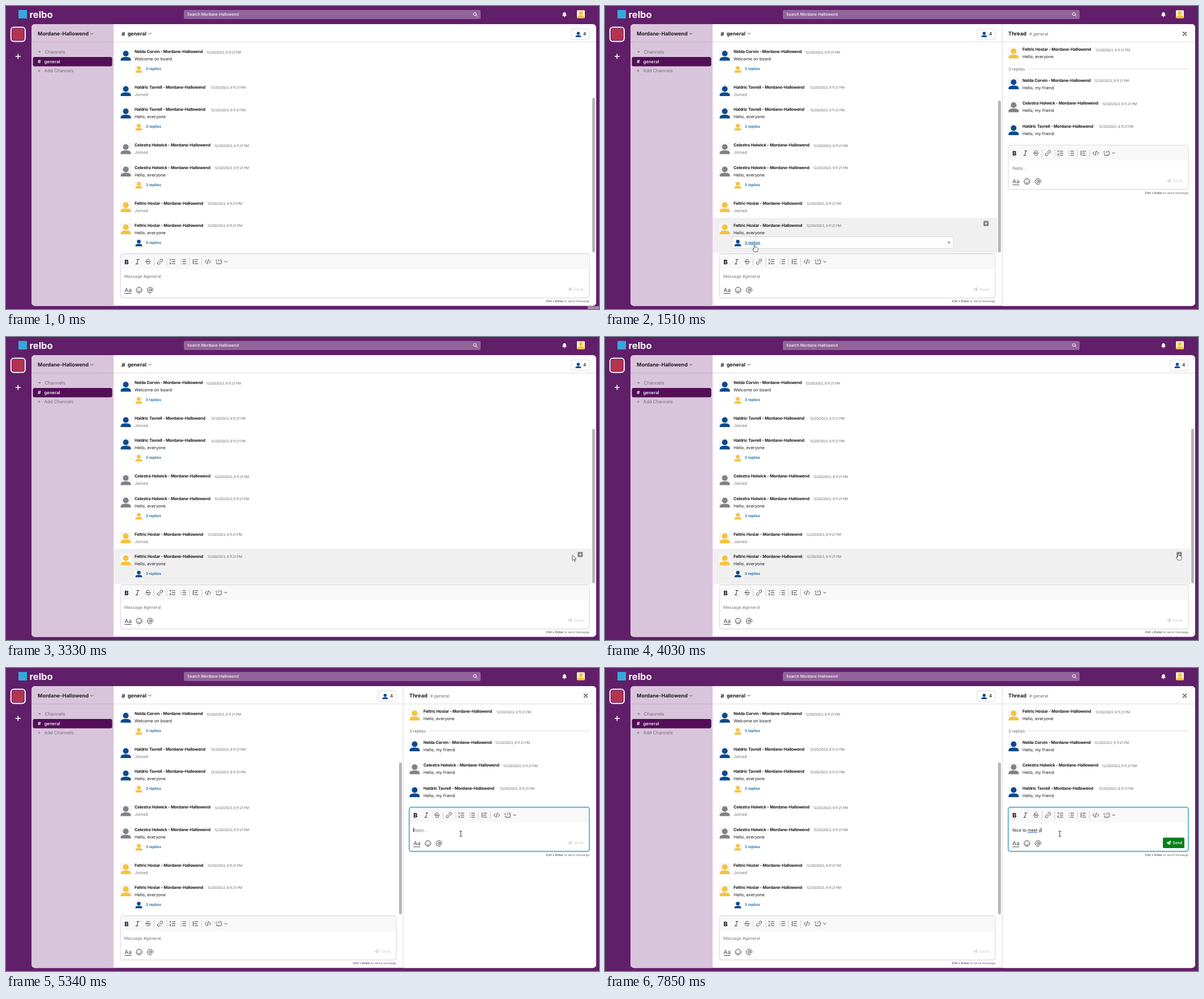
Animation, 1047 px wide and 535 px high, one loop 8000 ms. Source, as an HTML page:

```html
<!DOCTYPE html>
<html lang="en">
<head>
<meta charset="utf-8">
<title>Team chat</title>
<style>
html, body { margin: 0; width: 100%; height: 100%; overflow: hidden; background: #611f69; }
svg { display: block; width: 100%; height: 100%; }
text { font-family: Inter, "Open Sans", sans-serif; white-space: pre; text-rendering: geometricPrecision; }
.ico { fill: none; stroke: #3c3c3c; stroke-width: 1; stroke-linecap: round; stroke-linejoin: round; }
</style>
</head>
<body>
<svg id="stage" viewBox="0 0 1047 535"></svg>
<script>
const LOOP = 8000, OPEN_X = 701, SHUT_X = 1042;
const INK = '#1d1c1d', GREY = '#6b6a6b', LINK = '#1264a3';
const BLUE = '#0b4a8f', SILVER = '#828282', GOLD = '#f5c33b';
const TEAM = 'Mordane-Hallowend';
const STAMP = '12/20/2023, 9:11:21 PM';

// name, avatar colour, offset of the time stamp
const nelda = ['Nelda Corvin', BLUE, 127];
const haldric = ['Haldric Tavrell', BLUE, 135];
const celestra = ['Celestra Holwick', SILVER, 141];
const feltric = ['Feltric Hoslar', GOLD, 129];

// person, centre of the name line, text, colour of the replier
const feed = [
  [nelda, 80.5, 'Welcome on board', GOLD],
  [haldric, 143, 'Joined'],
  [haldric, 182.5, 'Hello, everyone', GOLD],
  [celestra, 245.5, 'Joined'],
  [celestra, 285, 'Hello, everyone', GOLD],
  [feltric, 348, 'Joined'],
  [feltric, 387, 'Hello, everyone', BLUE]
];
const thread = [
  [feltric, 76.5, 'Hello, everyone'],
  [nelda, 131, 'Hello, my friend'],
  [celestra, 171.5, 'Hello, my friend'],
  [haldric, 212, 'Hello, my friend']
];

// ---- drawing helpers ----
const text = (x, cy, size, str, fill = INK, weight = 400, more = '') =>
  `<text x="${x}" y="${cy + size * 0.364}" font-size="${size}" fill="${fill}" font-weight="${weight}" ${more}>${str}</text>`;
const rect = (x, y, w, h, r, fill, more = '') =>
  `<rect x="${x}" y="${y}" width="${w}" height="${h}" rx="${r}" fill="${fill}" ${more}/>`;
const line = (x1, y1, x2, y2, stroke, w = 1, more = '') =>
  `<path d="M${x1} ${y1}L${x2} ${y2}" stroke="${stroke}" stroke-width="${w}" fill="none" ${more}/>`;
const icon = (x, y, d, more = '') => `<path class="ico" transform="translate(${x} ${y})" d="${d}" ${more}/>`;
const group = (id, body, more = '') => `<g id="${id}" ${more}>${body}</g>`;
const chevron = (x, y, more) => icon(x, y, 'M-2.2-1.1L0 1.1 2.2-1.1', more);

const avatar = (x, y, k, fill, bg = '#f6f6f6') =>
  `<g transform="translate(${x} ${y}) scale(${k})">${rect(0, 0, 20, 20, 2, bg)}
  <g fill="${fill}"><circle cx="10" cy="7" r="5"/><path d="M1 19.6v-2c0-3.4 4-4.6 9-4.6s9 1.2 9 4.6v2z"/></g></g>`;

function message([[name, color, gap], c, body, replier], x) {
  const soft = body === 'Joined';
  return avatar(x, c - 3.5, 1, color) +
    text(x + 25.5, c, 7.3, `${name} - ${TEAM}`, INK, 700, 'letter-spacing="-.17"') +
    text(x + 25.5 + gap, c + 1, 6.1, STAMP, GREY, 400, 'letter-spacing="-.24"') +
    text(x + 25.5, c + 13, 7.45, body, soft ? '#7a797a' : INK) +
    (replier ? avatar(x + 26.5, c + 24.5, .65, replier) + text(x + 45, c + 30.5, 6.6, '3 replies', LINK, 600) : '');
}

function toolbar(x, y) {
  const list = 'M-1-3.5H4.5M-1 0H4.5M-1 3.5H4.5';
  const seps = [59.5, 82, 122, 143.5].map(d => line(x + d, y - 7, x + d, y + 7, '#d0d0d0')).join('');
  return seps +
    text(x + 11, y, 11, 'B', '#222', 800, 'text-anchor="middle"') +
    icon(x + 30, y, 'M-1-4H3M-3 4H1M1.2-4L-1.2 4') +
    icon(x + 49, y, 'M2.8-2.4C2-5-3-4.8-2.8-2 -2.6-.6 0-.2 1 .2M-2.8 2.2C-2 5 3.2 4.6 2.9 1.8M-4.4 0H4.4') +
    icon(x + 70, y, 'M-1 1.2L1.4-1.2M-.6-2.4L1-4a2.1 2.1 0 0 1 3 3L2.4.6M.6 2.4L-1 4a2.1 2.1 0 0 1-3-3L-2.4-.6') +
    icon(x + 92, y, list + 'M-4-4.4V-2M-4.5-4.2H-4M-4.6 1.4H-3.4L-4.6 4H-3.4') +
    icon(x + 111, y, list + 'M-4-3.5h.1M-4 0h.1M-4 3.5h.1') +
    icon(x + 132.5, y, 'M-4-4V4M-1.6-3.5H4.4M-1.6 0H3M-1.6 3.5H4.4') +
    icon(x + 154.5, y, 'M-2.4-2.8L-5.2 0-2.4 2.8M2.4-2.8L5.2 0 2.4 2.8M1-4L-1 4') +
    icon(x + 173.5, y, 'M-3.4-3.6L-5-2-3.4-.4M-.6-3.6L1-2-.6-.4M2.2-3.6H3.4a1.3 1.3 0 0 1 1.3 1.3V2.4a1.3 1.3 0 0 1-1.3 1.3H-2.6a1.3 1.3 0 0 1-1.3-1.3V1.4') +
    chevron(x + 186, y);
}

const composer = (id, x, y, w, body) =>
  rect(x, y, w, 78, 4, '#fff', `id="${id}Box" stroke="#d2d2d2"`) +
  rect(x + .5, y + .5, w - 1, 26.5, 3.5, '#f8f8f8', `id="${id}Bar"`) +
  toolbar(x, y + 14) + body +
  text(x + 13.5, y + 64, 10, 'Aa', '#444', 400, 'text-anchor="middle"') +
  line(x + 7.5, y + 70, x + 19.5, y + 70, '#444') +
  icon(x + 33, y + 64, 'M5 0A5 5 0 1 1-5 0 5 5 0 1 1 5 0M-2.6 1.2C-1.8 3.6 1.8 3.6 2.6 1.2M-1.8-1.6v.2M1.8-1.6v.2') +
  icon(x + 52.5, y + 64, 'M2 0A2 2 0 1 1-2 0 2 2 0 1 1 2 0M2-2V.8C2 2.6 5 2.4 5-.2A5 5 0 1 0 2.4 4.4');

const sendLabel = (right, y, fill) =>
  `<path transform="translate(${right - 35} ${y})" d="M4-4L-4 .6-1.6 1.6 2.6-2.4-.6 2V4L.8 2.6 2.8 3.4z" fill="${fill}"/>` +
  text(right - 28, y, 7, 'Send', fill, 500);
const hint = (right, y) =>
  text(right, y, 5.5, '<tspan font-weight="700">Ctrl + Enter</tspan> to send message', GREY, 400, 'text-anchor="end"');

// ---- parts of the screen ----
const topBar =
  rect(22, 7, 15, 15, 0, '#36a9dc') +
  text(41.5, 14.5, 16.5, 'relbo', '#fff', 700) +
  rect(314, 7, 524, 16, 2.5, '#93649b') +
  text(320, 15, 6.8, 'Search ' + TEAM, '#fff', 500) +
  icon(828.5, 14.8, 'M2-.6A2.6 2.6 0 1 1-3.2-.6 2.6 2.6 0 1 1 2-.6M1.4 1.4L3.6 3.6', 'style="stroke:#fff"') +
  '<path d="M982 17.8c1.4-1.2 1-3 1.4-4.6.4-1.6 1.4-2.2 2.6-2.4 1.2.2 2.2.8 2.6 2.4.4 1.6 0 3.4 1.4 4.6zM984.8 18.6h2.4a1.2 1.2 0 0 1-2.4 0z" fill="#fff"/>' +
  avatar(1008, 7.5, .7, GOLD, '#fdf3d3');

const rail =
  rect(8.8, 37.5, 25, 25, 5, 'none', 'stroke="#fff" stroke-width="2"') +
  rect(11, 39.7, 20.6, 20.6, 3, '#b5344f') +
  line(16.8, 89, 25.8, 89, '#fff', 1.6) + line(21.3, 84.5, 21.3, 93.5, '#fff', 1.6);

const sidebar =
  '<path d="M190 32H51a6 6 0 0 0-6 6V523.5a6 6 0 0 0 6 6H190z" fill="#d9c5db"/>' +
  line(45, 63.5, 190, 63.5, '#c3adc7') +
  text(56, 49, 9, TEAM, INK, 700) + chevron(151.5, 49) +
  '<path d="M57.2 80h4.6l-2.3 2.6z" fill="#756a78"/>' +
  text(68.5, 81, 8.2, 'Channels', '#756a78') +
  rect(47.5, 90, 140, 16.5, 3, '#520f57') +
  text(56, 98.3, 8.6, '#', '#fff', 600) + text(67.5, 98.3, 7.8, 'general', '#fff', 500) +
  text(55.5, 114, 9.5, '+', '#756a78') + text(67.5, 114.3, 7.9, 'Add Channels', '#756a78');

const rightSide =
  rect(998, 40.5, 32, 18.5, 3, '#fff', 'stroke="#dcdcdc"') +
  avatar(1005, 44.5, .54, BLUE, '#fff') + text(1019, 49.5, 8.2, '4', INK, 500) +
  sendLabel(1030, 500, '#d3d3d3') + hint(1030, 521);

const channel =
  text(204, 49, 10, '#', INK, 600) + text(214.7, 49, 9, 'general', INK, 700) + chevron(254, 48.7) +
  line(190, 63.5, 1042, 63.5, '#dddddd') +
  rect(190, 374, 844, 62.5, 0, '#f1f0f1', 'id="hover"') +
  group('plus', rect(-4.5, -4.5, 9, 9, 1.2, '#857f85') + line(-2.2, 0, 2.2, 0, '#fff') + line(0, -2.2, 0, 2.2, '#fff')) +
  group('preview', rect(224, 407.5, 391, 20.5, 3, '#fff', 'stroke="#d8d8d8"') +
    line(247, 421, 274.5, 421, LINK, .8) + text(604.5, 417.5, 8, '&gt;', LINK, 600)) +
  feed.map(m => message(m, 201.5)).join('') +
  rect(1035, 162, 5, 273, 2.5, '#b7b5b7', 'id="thumb"') +
  composer('main', 202, 437.5, 828, text(208.8, 477.7, 7.4, 'Message #general', '#777')) +
  group('right', rightSide);

// thread panel, drawn with its left edge at 0
const panel =
  '<path d="M0 32H335a6 6 0 0 1 6 6V523.5a6 6 0 0 1-6 6H0z" fill="#fff"/>' +
  line(.2, 32, .2, 529.5, '#d9d9d9') + line(0, 63.5, 341, 63.5, '#dddddd') +
  text(11, 49, 9.2, 'Thread', INK, 700) + text(48, 49, 7.5, '# general', GREY) +
  icon(322.6, 49, 'M-3-3L3 3M3-3L-3 3', 'style="stroke-width:1.3"') +
  thread.map(m => message(m, 10.5)).join('') +
  text(11, 111, 7.3, '3 replies', GREY) + line(46, 111, 329, 111, '#d8d8d8') +
  composer('reply', 11, 245.8, 318,
    text(18.2, 286, 7.2, 'Reply...', '#777', 400, 'id="holder"') +
    text(18.2, 286, 7.4, '', INK, 400, 'id="typed"') +
    line(0, 290.5, 1, 290.5, '#4668d8', 1, 'id="squiggle"') +
    line(0, 282, 0, 290, '#111', .9, 'id="caret"')) +
  group('idle', sendLabel(329, 308.5, '#d3d3d3')) +
  group('ready', rect(284, 299.5, 38, 18.5, 2, '#087f1c') + sendLabel(329, 308.5, '#fff')) +
  hint(329, 329.5) +
  group('focus', rect(11, 245.8, 318, 78, 4, 'none', 'stroke="#cfe8f1" stroke-width="3"') +
    rect(11, 245.8, 318, 78, 4, 'none', 'stroke="#3c9fc4" stroke-width="1.2"'));

const pointers =
  group('arrow', '<path d="M0 0V9.6L2.3 7.6 3.9 11.2 5.5 10.5 3.9 7H6.9z" fill="#fff" stroke="#333" stroke-width=".8" stroke-linejoin="round"/>') +
  group('hand', '<path d="M-1 .8C-1-.5 1-.5 1 .8V4.2C2 3.6 2.8 4 3 4.6 4 4.2 4.8 4.6 5 5.3 6 5 6.5 5.6 6.4 6.6L6 9.6 5 12H-.4L-3.2 8.2C-4 7-2.8 6-1 7.6z" fill="#fff" stroke="#2b2f45" stroke-width=".8" stroke-linejoin="round"/>') +
  group('beam', '<path d="M-2.4-4.6Q0-4.6 0-3.4 0-4.6 2.4-4.6M0-3.4V4M-2.4 5Q0 5 0 3.8 0 5 2.4 5" fill="none" stroke="#222" stroke-width=".9"/>');

document.getElementById('stage').innerHTML =
  rect(0, 0, 1047, 535, 0, '#611f69') + topBar + rail +
  rect(45, 32, 997, 497.5, 6, '#fff') + sidebar + channel +
  group('thread', panel) +
  rect(1027, 530, 20, 5, 0, '#a78bab', 'id="corner"') + pointers;

// ---- motion ----
const el = id => document.getElementById(id);
const show = (id, on) => el(id).setAttribute('display', on ? 'inline' : 'none');
const move = (id, x, y) => el(id).setAttribute('transform', `translate(${x} ${y})`);
const smooth = p => (p = Math.min(1, Math.max(0, p)), p * p * (3 - 2 * p));

const slides = [[1170, 310, 1], [2460, 330, -1], [4200, 310, 1]];
const edge = t => SHUT_X - (SHUT_X - OPEN_X) *
  slides.reduce((sum, [at, span, dir]) => sum + dir * smooth((t - at) / span), 0);

// time, x, y
const path = [
  [290, 640, 533], [990, 264, 422], [1540, 264, 422], [1710, 1026, 56], [1960, 1026, 56],
  [2110, 1023, 48], [2380, 1023, 48], [2600, 1016, 65], [2700, 1014, 70], [3010, 934, 346],
  [3130, 938, 350], [3330, 1000, 385], [3430, 995, 388], [3560, 995, 388], [3720, 935, 392],
  [3840, 938, 392], [4030, 1012, 382], [4240, 1012, 382], [4430, 979, 384], [4680, 979, 384],
  [5140, 803, 292.5], [LOOP, 803, 292.5]
];
function pointerAt(t) {
  const i = Math.max(1, path.findIndex(k => k[0] >= t));
  const [t0, x0, y0] = path[i - 1], [t1, x1, y1] = path[i];
  const p = smooth((t - t0) / (t1 - t0));
  return [x0 + (x1 - x0) * p, y0 + (y1 - y0) * p];
}

const phrase = 'Nice to meet y';
const keys = [5940, 6140, 6240, 6450, 6550, 6650, 6750, 6850, 7050, 7150, 7350, 7550, 7650, 7850];

function drawReply(t) {
  const n = keys.filter(k => k <= t).length, typed = el('typed');
  const last = n ? keys[n - 1] : 5240;
  typed.textContent = phrase.slice(0, n);
  const x = 18.5 + (n ? typed.getComputedTextLength() : 0);
  show('holder', !n);
  show('idle', !n);
  show('ready', n);
  show('focus', t >= 5240);
  show('caret', t >= 5240 && t - last < 500);
  move('caret', x, 0);
  show('squiggle', n > 12);
  if (n > 12) {
    const a = 18.2 + typed.getSubStringLength(0, 8), b = a + typed.getSubStringLength(8, 4);
    el('squiggle').setAttribute('d', `M${a} 290.5H${b}`);
  }
}

function drawPointer(t, X) {
  const [x, y] = pointerAt(t), on = t >= 290;
  const inFeed = on && x > 190 && x < X - 8 && y > 67 && y < 436;
  const row = inFeed ? feed.filter(m => m[1] - 13 <= y).pop() : null;
  const onPreview = inFeed && y > 407 && x < 615;
  const onPlus = row && Math.abs(x - X + 28) < 6 && Math.abs(y - row[1] + 3) < 6;
  const onClose = X < 702 && Math.abs(x - 1023.5) < 6 && Math.abs(y - 49) < 6;
  const kind = onPreview || onPlus || onClose ? 'hand' : X < 702 && x > 712 && x < 1030 && y > 274 && y < 323 ? 'beam' : 'arrow';
  for (const id of ['arrow', 'hand', 'beam']) {
    show(id, on && id === kind);
    move(id, x, y);
  }
  show('hover', row);
  show('plus', row);
  show('preview', onPreview);
  if (row) {
    const hover = el('hover');
    hover.setAttribute('y', row[1] - 13);
    hover.setAttribute('height', row[3] ? 62.5 : 39.3);
    hover.setAttribute('width', X - 198);
    move('plus', X - 28.2, row[1] - 3);
  }
}

function draw(t) {
  const X = edge(t);
  show('corner', t < 100);
  show('thread', X < SHUT_X - .1);
  move('thread', X, 0);
  move('right', X - SHUT_X, 0);
  el('mainBox').setAttribute('width', X - 214);
  el('mainBar').setAttribute('width', X - 215);
  const top = X < 702 ? 167 : 162, thumb = el('thumb');
  thumb.setAttribute('x', X - 7);
  thumb.setAttribute('y', top);
  thumb.setAttribute('height', 435 - top);
  drawReply(t);
  drawPointer(t, X);
}

const start = performance.now();
function tick() {
  draw((performance.now() - start) % LOOP);
  requestAnimationFrame(tick);
}
tick();
</script>
</body>
</html>
```
